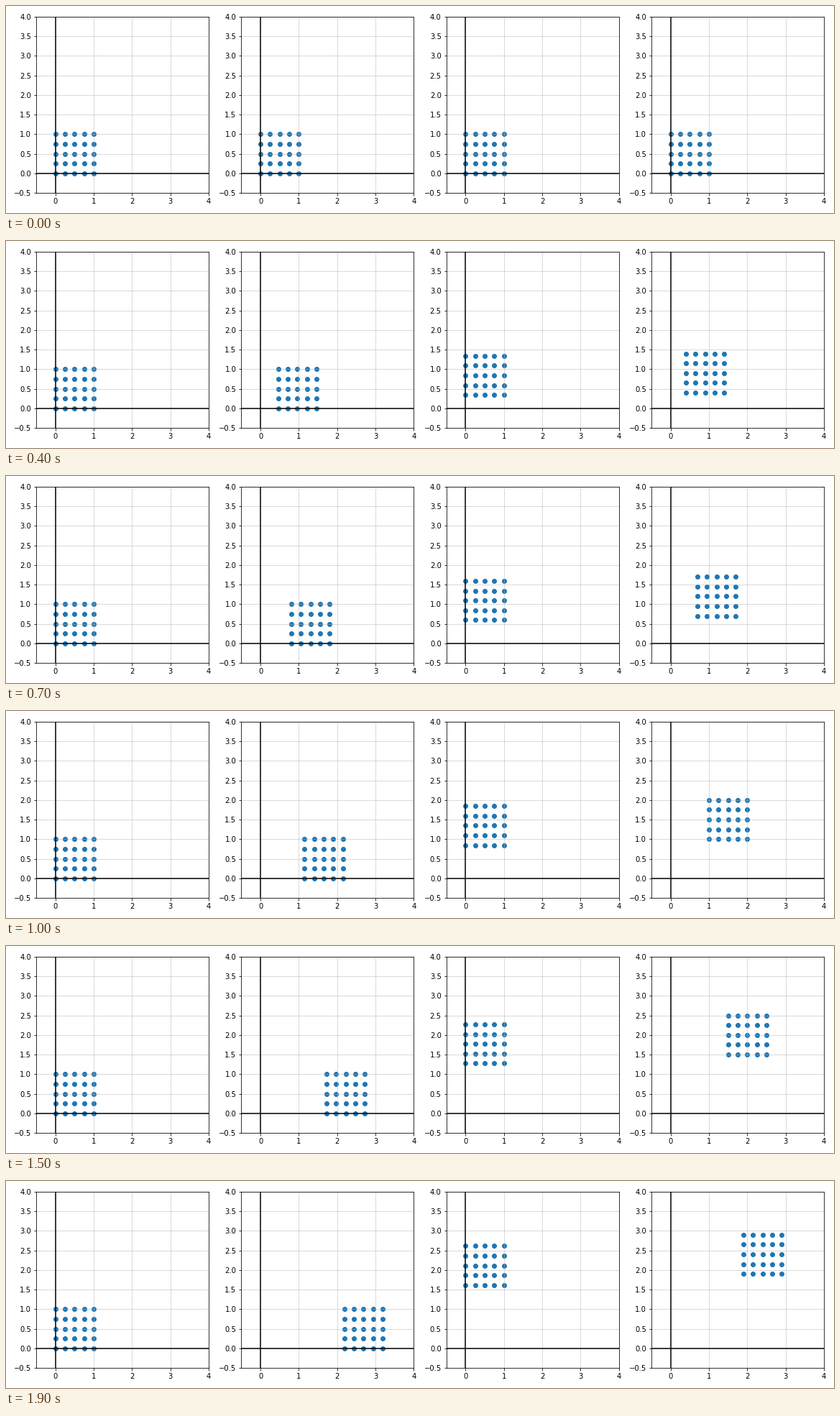
A matplotlib script that plays this animation: 1152 px wide and 288 px high, repeating every 2000 ms.

```python
import numpy as np
import matplotlib.pyplot as plt
from matplotlib.animation import FuncAnimation

FRAMES = 20
INTERVAL = 100  # ms

# Shift per step (dx, dy) of the point grid in each panel
STEPS = np.array([(0, 0), (0.115, 0), (0, 0.085), (0.1, 0.1)])

plt.rcParams["font.family"] = "DejaVu Sans"
plt.rcParams["font.size"] = 10

side = np.linspace(0, 1, 5)
points = np.array([(x, y) for x in side for y in side])


def make_panel(ax):
    ax.set(xlim=(-0.5, 4), ylim=(-0.5, 4),
           xticks=np.arange(5), yticks=np.arange(-0.5, 4.1, 0.5))
    ax.grid(alpha=0.6)
    ax.axhline(0, color="black")
    ax.axvline(0, color="black")
    return ax.scatter(points[:, 0], points[:, 1], color="tab:blue")


fig, axes = plt.subplots(1, 4, figsize=(16, 4), dpi=72)
dots = [make_panel(ax) for ax in axes]
fig.tight_layout()


def update(i):
    for cloud, step in zip(dots, STEPS):
        cloud.set_offsets(points + i * step)
    return dots


anim = FuncAnimation(fig, update, frames=FRAMES, interval=INTERVAL,
                     repeat=True, repeat_delay=0)
plt.show()
```
